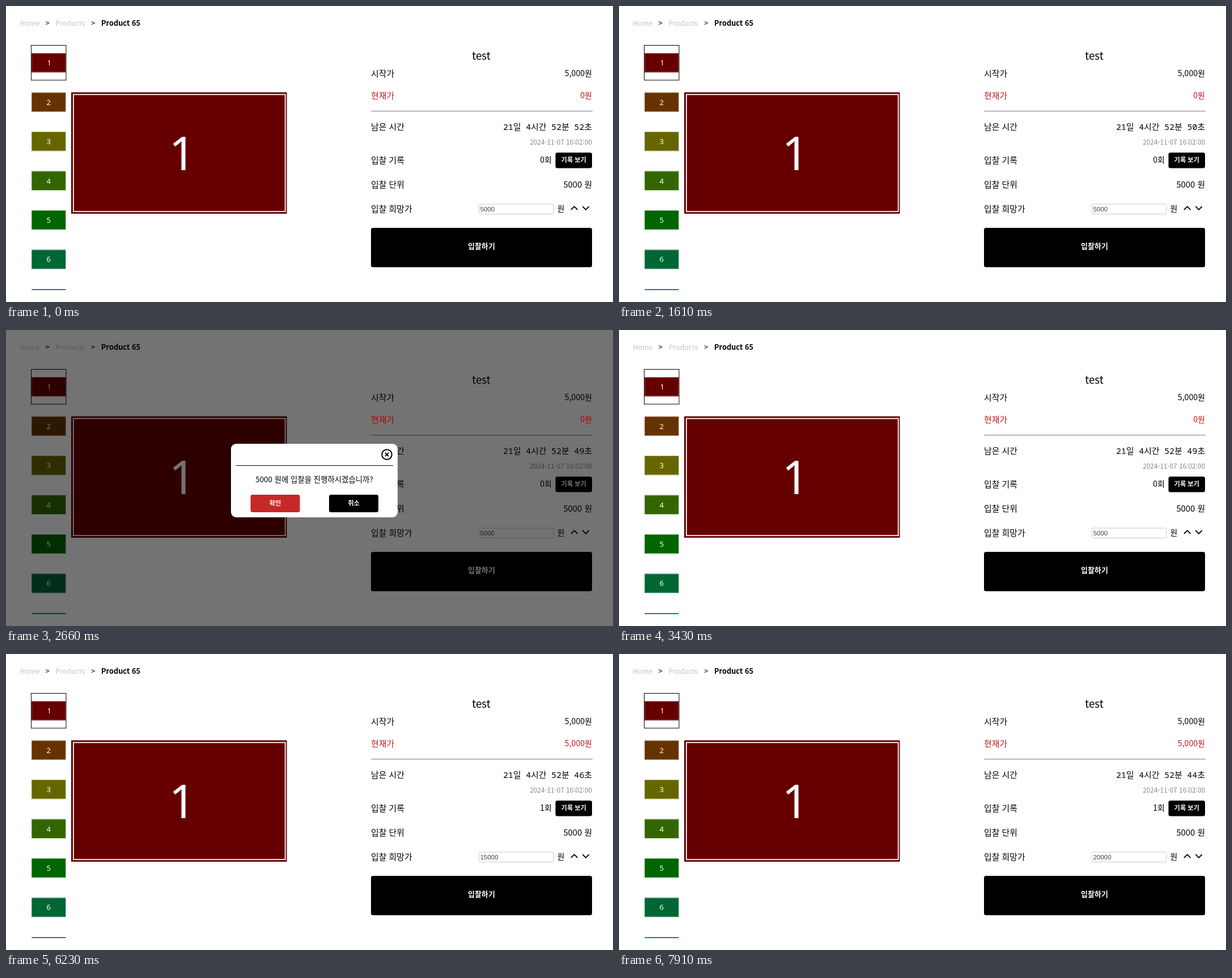
Write an HTML page that moves like this. It is 1071x523 px and loops after 8000 ms.

```html
<!DOCTYPE html>
<html lang="ko">
<meta charset="utf-8">
<title>Product 65</title>
<style>
  html, body { margin: 0; width: 100%; height: 100%; overflow: hidden; background: #fff }
  svg { display: block; width: 100%; height: 100%;
    font-family: 'Noto Sans CJK KR', 'Noto Sans CJK JP', sans-serif }
  .num { font-family: 'Noto Sans', sans-serif }
  .mono { font-family: 'Noto Sans Mono', 'Noto Sans CJK KR', monospace }
  .input { font-family: 'Liberation Sans', Arial, sans-serif }
</style>
<svg id="stage" viewBox="0 0 1071 523"></svg>
<script>
const RED = '#c4161c', LOOP = 8000;

// y is the middle of the capitals
function text(str, x, y, size, { anchor = 'start', fill = '#000', weight = 400, id = '', cls = '' } = {}) {
  return `<text id="${id}" class="${cls}" x="${x}" y="${y + size * .37}" font-size="${size}"
    text-anchor="${anchor}" fill="${fill}" font-weight="${weight}" xml:space="preserve">${str}</text>`;
}
const right = (str, x, y, size, opt) => text(str, x, y, size, { anchor: 'end', ...opt });
const rect = (x, y, w, h, fill, r = 0, more = '') =>
  `<rect x="${x}" y="${y}" width="${w}" height="${h}" rx="${r}" fill="${fill}" ${more}/>`;
const path = (d, width = 1, stroke = '#000') =>
  `<path d="${d}" fill="none" stroke="${stroke}" stroke-width="${width}"/>`;
const button = (x, y, w, h, label, size, textY, fill = '#000') =>
  rect(x, y, w, h, fill, 3.5) +
  text(label, x + w / 2, textY, size, { anchor: 'middle', fill: '#fff', weight: 700 });

// One slide picture, 380.5 by 214.5
function slide(n, color, x, y, scale) {
  return `<g transform="translate(${x} ${y}) scale(${scale})">` +
    rect(0, 0, 380.5, 214.5, color) +
    rect(3.9, 3.9, 373.8, 206.8, 'none', 0, 'stroke="#fff" stroke-width="1.8"') +
    text(n, n == 1 ? 196 : 190.5, 107.5, 82, { anchor: 'middle', fill: '#fff', cls: 'num' }) + '</g>';
}

const colors = ['#600', '#630', '#660', '#360', '#060', '#063', '#066'];
const thumbs = colors.map((c, i) => slide(i + 1, c, 45, 83.3 + i * 69.45, .159)).join('');

const labels = [['시작가', 119], ['남은 시간', 213.5], ['입찰 기록', 272],
  ['입찰 단위', 315.5], ['입찰 희망가', 358]]
  .map(([s, y]) => text(s, 644, y, 14.9)).join('');

const page =
  text('Home', 24.5, 30, 12.4, { fill: '#c4c4c4' }) +
  text('&gt;', 69.5, 30, 13, { weight: 500 }) +
  text('Products', 87.5, 30, 12.4, { fill: '#c4c4c4' }) +
  text('&gt;', 150, 30, 13, { weight: 500 }) +
  text('Product 65', 168, 30, 12.8, { weight: 700 }) +
  `<clipPath id="list"><path d="M40 60H110V502H40Z"/></clipPath><g clip-path="url(#list)">${thumbs}</g>` +
  rect(44.5, 69.5, 61.5, 61.5, 'none', 0, 'stroke="#000"') +
  slide(1, colors[0], 115, 152.5, 1) +
  text('test', 838.5, 88.5, 18.8, { anchor: 'middle' }) + labels +
  right('5,000원', 1034, 119, 14.1) +
  path('M644.5 185.7H1035', 1.2, '#999') + path('M644.5 187H1035', 1, '#ddd') +
  right('', 1034, 214, 14.8, { id: 'clock', cls: 'mono' }) +
  right('2024-11-07 16:02:00', 1034, 240.5, 11.8, { fill: '#888' }) +
  right('', 963, 272, 14, { id: 'count' }) +
  button(969.5, 259, 64.5, 27.5, '기록 보기', 11.2, 272) +
  right('5000 원', 1034, 315.5, 14.8) +
  rect(834.5, 350, 131.5, 17.5, '#fff', 2, 'stroke="#ccc"') +
  text('', 836.7, 359, 11.5, { id: 'bid', cls: 'input', fill: '#444' }) +
  text('원', 972.5, 358, 14) +
  path('M997 360l5.7-5.8 5.7 5.8M1017.3 354.2l5.7 5.8 5.7-5.8', 1.8) +
  button(644, 392, 390, 69.5, '입찰하기', 13, 424);

const price =
  text('현재가', 644, 158, 14.9, { fill: 'inherit' }) +
  right('', 1034, 158, 14.1, { id: 'price', fill: 'inherit' });

const modal =
  rect(397, 201, 294, 130, '#fff', 9) +
  `<circle cx="672" cy="220" r="8.8" fill="none" stroke="#000" stroke-width="2"/>` +
  path('M669 217l6 6M675 217l-6 6', 2) +
  path('M406 239.5H683') +
  text('5000 원에 입찰을 진행하시겠습니까?', 544, 264, 13.4, { anchor: 'middle' }) +
  button(431.5, 291, 87, 31, '확인', 11.2, 306, '#c62828') +
  button(570, 291, 87, 31, '취소', 11.2, 306);

const $ = id => document.getElementById(id);
$('stage').innerHTML = page + rect(0, 0, 1071, 523, '#000', 0, 'id="dim" opacity=".55"') +
  `<g id="red">${price}</g><g id="modal">${modal}</g>`;

// Last value whose start time has passed
const at = (t, steps) => steps.filter(([start]) => t >= start).pop()[1];

function draw(t) {
  const second = 52 - Math.max(0, Math.floor((t - 560) / 1050) + 1);
  const open = t >= 2100 && t < 3430;
  const done = t >= 3570;
  $('clock').textContent = `21일 4시간 52분 ${second}초`;
  $('price').textContent = done ? '5,000원' : '0원';
  $('count').textContent = done ? '1회' : '0회';
  $('bid').textContent = at(t, [[0, 5000], [3570, 10000], [5250, 15000], [5390, 20000],
    [6230, 15000], [6440, 10000], [7140, 15000], [7280, 20000]]);
  $('dim').style.display = $('modal').style.display = open ? '' : 'none';
  $('modal').setAttribute('opacity', Math.min(1, .95 + .05 * (t - 2100) / 140));
  $('red').setAttribute('fill', open ? '#b80000' : RED);
}

const begin = performance.now();
function tick() {
  draw((performance.now() - begin) % LOOP);
  requestAnimationFrame(tick);
}
tick();
</script>
</html>
```
